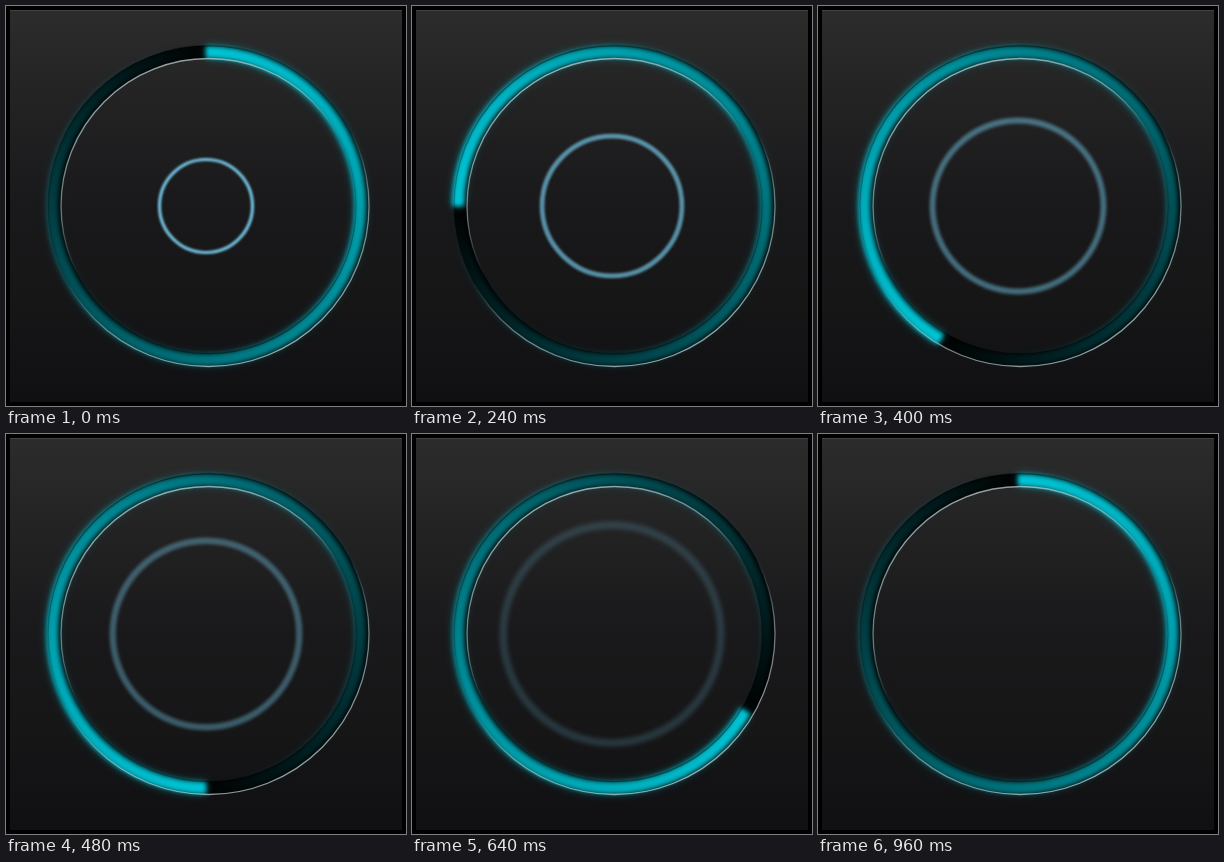
Recreate the animation shown at these times as an HTML page with a canvas. Size 400x400 px, loop 1000 ms.

```html
<!DOCTYPE html>
<html lang="en">
<head>
<meta charset="utf-8">
<title>Loading ring</title>
<style>
  html, body { margin: 0; width: 100%; height: 100%; overflow: hidden; background: #000; }
  canvas { display: block; width: 400px; height: 400px; }
</style>
</head>
<body>
<canvas id="stage" width="400" height="400"></canvas>
<script>
const ctx = document.getElementById('stage').getContext('2d');
const LOOP = 1000, STEP = 40, TURN_STEPS = 24, FADE_STEPS = 20;
const TRACK_X = 202.5, TRACK_Y = 200, OUTER = 160.5, INNER = 147.5;
const LIGHT = [0.47, 0.88];

function ring(x, y, r, width, style, blur = 0, alpha = 1) {
  ctx.save();
  ctx.filter = blur ? `blur(${blur}px)` : 'none';
  ctx.globalAlpha = alpha;
  ctx.lineWidth = width;
  ctx.strokeStyle = style;
  ctx.beginPath();
  ctx.arc(x, y, r, 0, Math.PI * 2);
  ctx.stroke();
  ctx.restore();
}

function panel() {
  const g = ctx.createLinearGradient(0, 4, 0, 396);
  g.addColorStop(0, '#2c2c2c');
  g.addColorStop(0.25, '#222223');
  g.addColorStop(0.5, '#19191b');
  g.addColorStop(0.75, '#161617');
  g.addColorStop(1, '#101013');
  ctx.fillStyle = '#000';
  ctx.fillRect(0, 0, 400, 400);
  ctx.fillStyle = g;
  ctx.fillRect(4, 4, 392, 392);
  ctx.fillStyle = '#424242';
  ctx.fillRect(4, 4, 392, 1);
}

// Edge lit from the upper left: sign 1 catches light there, -1 on the far side.
function bevel(r, sign) {
  const dx = LIGHT[0] * r * sign, dy = LIGHT[1] * r * sign;
  const g = ctx.createLinearGradient(TRACK_X - dx, TRACK_Y - dy, TRACK_X + dx, TRACK_Y + dy);
  g.addColorStop(0, 'rgba(215,225,225,0.68)');
  g.addColorStop(0.3, 'rgba(205,215,215,0.5)');
  g.addColorStop(0.5, 'rgba(190,200,200,0)');
  g.addColorStop(0.5, 'rgba(0,0,0,0)');
  g.addColorStop(1, 'rgba(0,0,0,0.4)');
  ring(TRACK_X, TRACK_Y, r, 1.3, g);
}

function sweep(head) {
  const g = ctx.createConicGradient(head, 200, 200);
  g.addColorStop(0, 'rgba(0,200,217,0.97)');
  g.addColorStop(1, 'rgba(0,200,217,0)');
  ring(200, 200, 154, 13, g, 4.5, 0.4);
  ring(200, 200, 154, 11.5, g, 2.2);
}

function pulse(k) {
  if (k >= FADE_STEPS) return;
  const r = 46.5 + 3.9 * k, scale = r / 46.5;
  ring(200, 200, r, 3.2 * scale, 'rgb(115,195,225)', 0.8 * scale, 1 - k / FADE_STEPS);
}

function draw(ms) {
  const k = Math.floor((ms % LOOP) / STEP);
  panel();
  ring(TRACK_X, TRACK_Y, (OUTER + INNER) / 2, OUTER - INNER, '#030303');
  sweep(-Math.PI / 2 - k / TURN_STEPS * Math.PI * 2);
  bevel(INNER, 1);
  bevel(OUTER, -1);
  pulse(k);
}

function tick() {
  draw(performance.now());
  requestAnimationFrame(tick);
}
tick();
</script>
</body>
</html>
```
